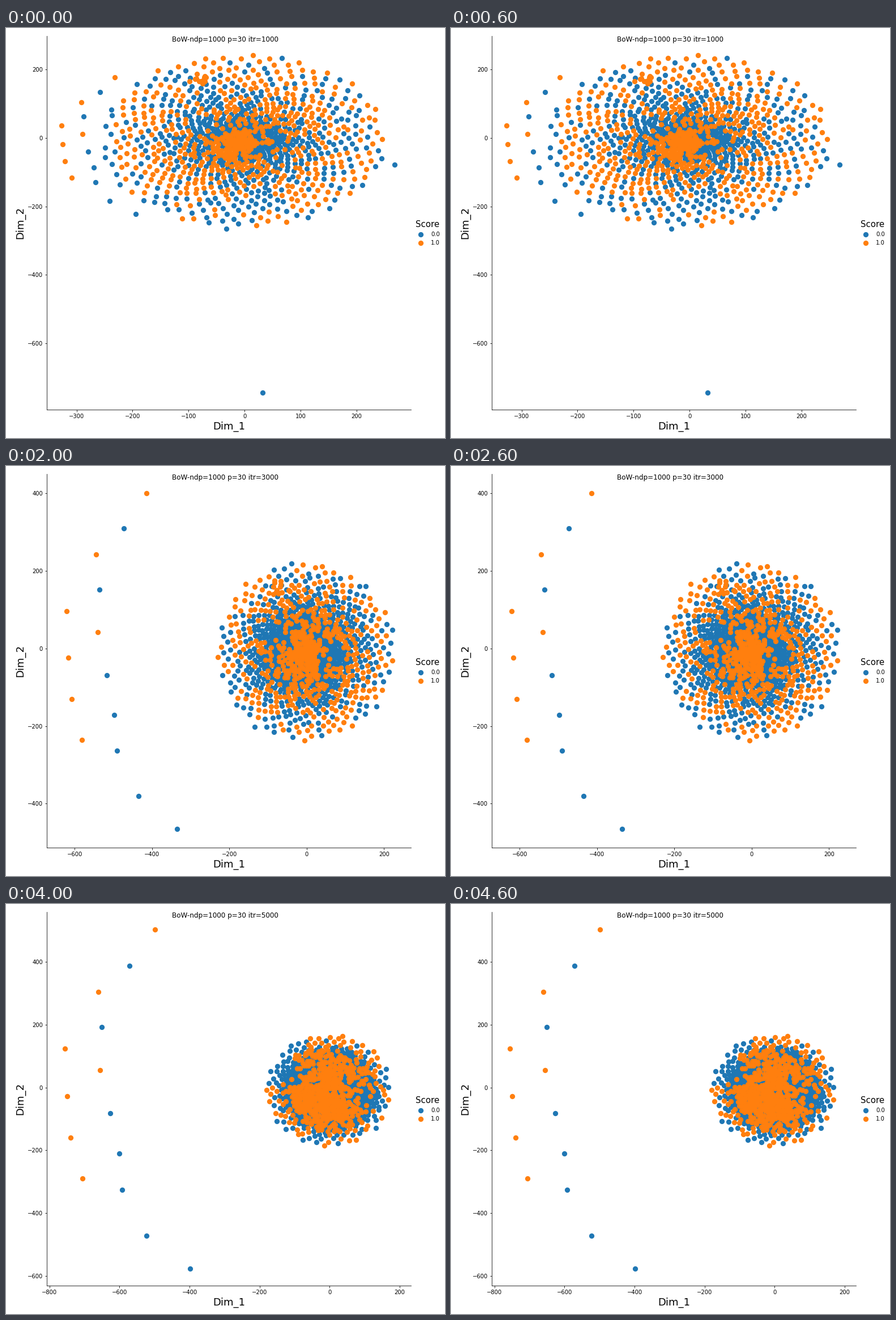
Animation of 775x723 px, one loop 5000 ms. Source, as a matplotlib script:

```python
import numpy as np
import matplotlib.pyplot as plt
from matplotlib.animation import FuncAnimation

W, H, DPI = 775, 723, 72
BLUE, ORANGE = "#1f77b4", "#ff7f0e"
COUNT = 1150
GOLDEN = np.pi * (3 - np.sqrt(5))
CENTRE = np.array([-3, -8])

plt.rcParams["font.family"] = "DejaVu Sans"
plt.rcParams["font.size"] = 10

# x limits, y limits
VIEWS = [
    ((-353.2, 297.1), (-793.4, 299.0)),
    ((-565.3, 288.9), (-422.8, 366.4)),
    ((-672.4, 269.8), (-513.3, 450.3)),
    ((-749.2, 254.7), (-580.5, 511.8)),
    ((-807.4, 232.2), (-630.7, 559.7)),
]

# Strays at their farthest; each step shows them scaled by GROWTH
GROWTH = [0.37, 0.65, 0.803, 0.917, 1]
PULL = np.array([-75, -14])
FAR_BLUE = np.array([
    (-571, 388), (-650, 192), (-626, -82), (-601, -210),
    (-592, -325), (-523, -471), (-399, -576)])
FAR_ORANGE = np.array([
    (-498, 502), (-661, 305), (-756, 123), (-655, 56),
    (-749, -27), (-739, -159), (-706, -290)])
LONERS = [(32, -744), (268, -78.5)]


def strays(far, i):
    return far * GROWTH[i] + PULL * (1 - GROWTH[i])


def spiral(rng, power, rim, rim_power):
    """Golden-angle spiral in a unit disc, dense inside and sparse at the rim."""
    u = (np.arange(COUNT) + 0.5) / COUNT
    r = (1 - rim) * u**power + rim * u**rim_power
    gap = np.sqrt(2 * np.pi * r * np.gradient(r))
    a = GOLDEN * np.arange(COUNT) + rng.uniform(0, 2 * np.pi)
    pts = r[:, None] * np.column_stack([np.cos(a), np.sin(a)])
    return pts + 0.11 * gap[:, None] * rng.normal(size=pts.shape)


def bump(pts, x, y, size):
    return np.exp(-((pts - (x, y))**2).sum(1) / (2 * size**2))


def cloud(i):
    rng = np.random.default_rng(30 + i)
    shrink = max(0, i - 1)
    radius = 255 - 25 * shrink
    s = 1 + 0.17 * shrink
    unit = spiral(rng, 0.9 - 0.13 * shrink, 0.17 + 0.035 * shrink, 4 + 1.7 * shrink)
    pts = CENTRE + radius * unit

    share = (0.5 + 0.28 * bump(pts, -12 * s, -25 * s, 32 * s)
             - 0.48 * bump(pts, -74 * s, 34 * s, 27 * s)
             - 0.45 * bump(pts, 52 * s, -18 * s, 28 * s))
    warm = rng.random(COUNT) < share
    knot = CENTRE + radius * np.array([-0.31, 0.69]) + rng.normal(0, 9, (10, 2))

    blue = [pts[~warm], strays(FAR_BLUE, i)]
    if i == 0:
        blue.append(LONERS)
    return np.vstack(blue), np.vstack([pts[warm], knot, strays(FAR_ORANGE, i)])


DATA = [cloud(i) for i in range(len(VIEWS))]

fig = plt.figure(figsize=(W / DPI, H / DPI), dpi=DPI, facecolor="white")
title = fig.suptitle("", x=387 / W, fontsize=12)

ax = fig.add_axes([72 / W, 50 / H, 643 / W, 659.5 / H])
ax.spines[["top", "right"]].set_visible(False)
ax.set_xlabel("Dim_1", fontsize=18)
ax.set_ylabel("Dim_2", fontsize=18)
dots = [ax.scatter([], [], s=60, linewidths=1.5, color=color, label=label)
        for color, label in [(BLUE, "0.0"), (ORANGE, "1.0")]]
fig.legend(handles=dots, title="Score", title_fontsize=15,
           loc="center right", scatterpoints=1, frameon=False)


def update(i):
    xlim, ylim = VIEWS[i]
    ax.set(xlim=xlim, ylim=ylim)
    for dot, pts in zip(dots, DATA[i]):
        dot.set_offsets(pts)
    title.set_text(f"BoW-ndp=1000 p=30 itr={1000 * (i + 1)}")
    return *dots, title


anim = FuncAnimation(fig, update, frames=len(VIEWS), interval=1000,
                     repeat=True, repeat_delay=0, blit=False)
plt.show()
```
